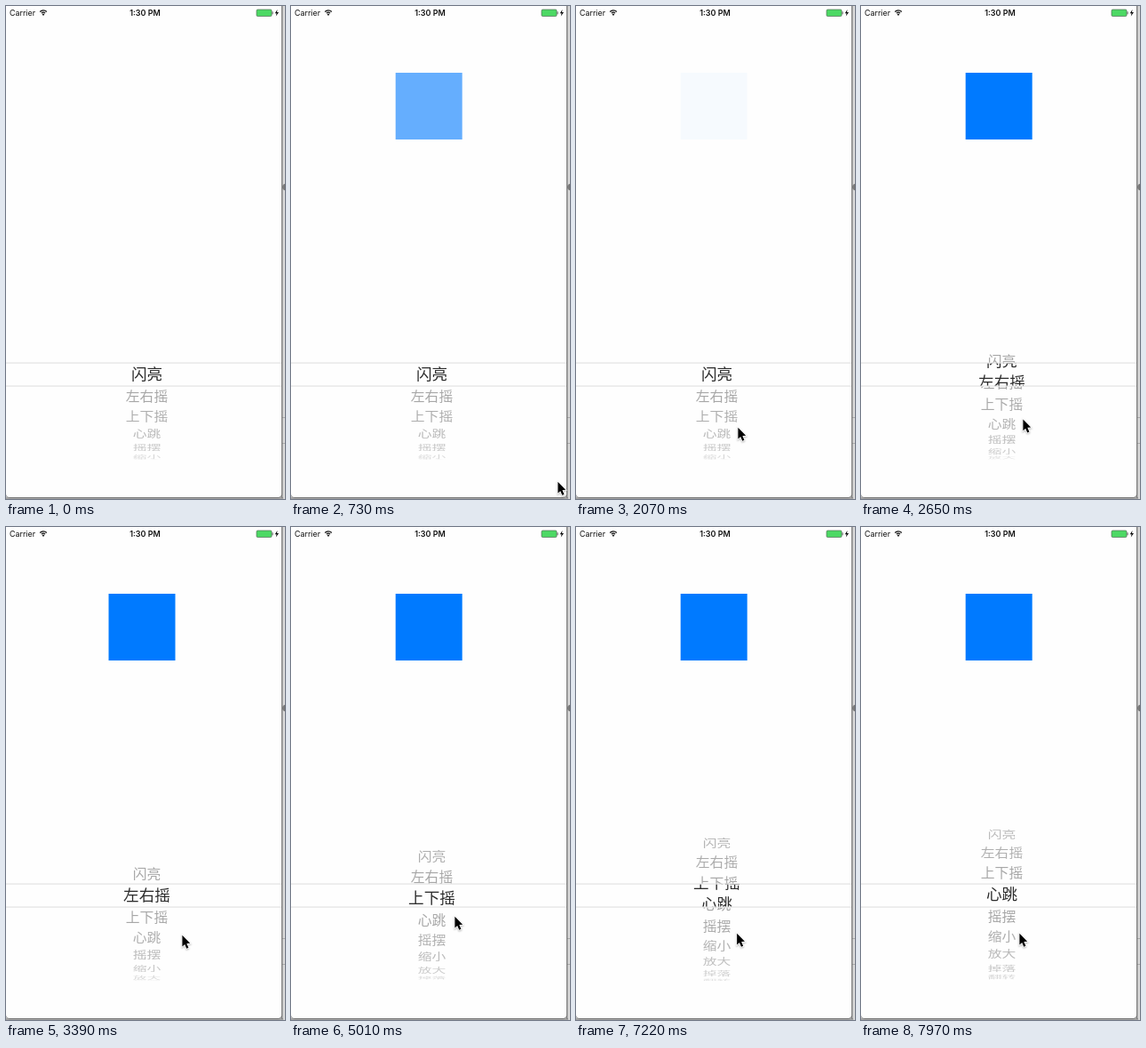
Animation of 314x554 px, one loop 8 s. Source, as an HTML page with a canvas:

```html
<!DOCTYPE html>
<html lang="zh">
<head>
<meta charset="utf-8">
<style>
html, body { margin: 0; width: 100%; height: 100%; overflow: hidden; background: #fff; }
canvas { display: block; width: 314px; height: 554px; }
</style>
</head>
<body>
<canvas id="stage" width="314" height="554"></canvas>
<script>
const ctx = document.getElementById('stage').getContext('2d');
const LOOP = 8000;
const LATIN = 'Inter, "Liberation Sans", sans-serif';
const CJK = '"Noto Sans CJK SC", "Noto Sans CJK", sans-serif';
const ROWS = ['闪亮', '左右摇', '上下摇', '心跳', '摇摆', '缩小', '放大', '掉落', '翻转'];
const WHEEL = { x: 158.5, y: 414, radius: 96, step: 14.7 * Math.PI / 180, top: 318, bottom: 510 };
const BAND = { top: 401, bottom: 427 };
const SHAKE = { period: 260, cycles: 4, reach: 7.5 };
const FLASH = { period: 1044, end: 2610 };

// Eased 0 -> 1 between two times
function glide(t, from, to) {
  const u = Math.min(1, Math.max(0, (t - from) / (to - from)));
  return u * u * (3 - 2 * u);
}

// 0 -> 1 -> 0 over one period
function triangle(t, period) {
  return 1 - Math.abs(2 * (t % period) / period - 1);
}

function shake(t) {
  if (t < 0 || t >= SHAKE.period * SHAKE.cycles) return 0;
  return SHAKE.reach * (2 * triangle(t, SHAKE.period) - 1);
}

// Three drags, one row each; the last slightly overshoots
function scrollAt(t) {
  return glide(t, 2200, 2980) + glide(t, 4050, 5300) + 1.06 * glide(t, 6550, 7820);
}

function cursorAt(t) {
  const enter = glide(t, 730, 1900);
  const press = glide(t, 4050, 4850);
  return {
    x: 299 - 118 * enter + 16 * glide(t, 2750, 3240) - 14 * press - 6 * glide(t, 6550, 7820),
    y: 533 - 61 * enter - 15 * glide(t, 2200, 2980) - 21 * press + 19 * glide(t, 5500, 6200)
  };
}

function rect(x, y, w, h, color) {
  ctx.fillStyle = color;
  ctx.fillRect(x, y, w, h);
}

function rounded(x, y, w, h, radii, color) {
  ctx.fillStyle = color;
  ctx.beginPath();
  ctx.roundRect(x, y, w, h, radii);
  ctx.fill();
}

function polygon(points) {
  ctx.beginPath();
  points.forEach(([x, y]) => ctx.lineTo(x, y));
  ctx.closePath();
}

function clipped(top, bottom, draw) {
  ctx.save();
  ctx.beginPath();
  ctx.rect(0, top, 314, bottom - top);
  ctx.clip();
  draw();
  ctx.restore();
}

function drawWindow() {
  rect(0, 0, 314, 554, '#d6d6d6');
  [462, 491].forEach(y => rect(311, y, 3, 1, '#aaa'));
  ctx.fillStyle = '#777';
  ctx.beginPath();
  ctx.arc(315, 203.5, 3.8, 0, 7);
  ctx.fill();
  rect(0, 552, 312, 2, '#a4a4a4');
  rect(310, 0, 1.3, 553, '#7c7c7c');
  rounded(-0.5, -10, 311.5, 563, [0, 0, 5, 5], '#777');
  rounded(0, -10, 310, 562, [0, 0, 4, 4], '#fefefe');
}

function drawStatusBar() {
  ctx.fillStyle = '#111';
  ctx.textBaseline = 'alphabetic';
  ctx.textAlign = 'left';
  ctx.font = '8.9px ' + LATIN;
  ctx.fillText('Carrier', 4, 11);
  ctx.textAlign = 'center';
  ctx.font = '600 9px ' + LATIN;
  ctx.fillText('1:30 PM', 156.5, 11);

  ctx.strokeStyle = '#111';
  ctx.lineWidth = 1.3;
  [2.8, 5.2].forEach(r => {
    ctx.beginPath();
    ctx.arc(42, 10, r, -Math.PI * 0.76, -Math.PI * 0.24);
    ctx.stroke();
  });
  polygon([[42, 11], [40.6, 9.2], [42, 8.6], [43.4, 9.2]]);
  ctx.fill();

  rounded(282, 4, 17, 7.5, 1.2, '#4cd964');
  ctx.strokeStyle = '#4f6a55';
  ctx.lineWidth = 0.7;
  ctx.stroke();
  rect(299.5, 6.3, 1, 3, '#555');
  ctx.fillStyle = '#111';
  polygon([[305.5, 4], [302.6, 8.2], [304.5, 8.2], [303.8, 11.5], [307, 7], [305, 7]]);
  ctx.fill();
}

function drawSquare(t) {
  ctx.globalAlpha = t < FLASH.end ? triangle(t, FLASH.period) : 1;
  rect(117.7 + shake(t - 3085), 75 + shake(t - 5530), 75, 75, '#007aff');
  ctx.globalAlpha = 1;
}

function drawRows(scroll, size, color, fade, lift) {
  ctx.font = size + 'px ' + CJK;
  ctx.textAlign = 'center';
  ctx.fillStyle = color;
  ROWS.forEach((label, i) => {
    const angle = (i - scroll) * WHEEL.step;
    if (Math.abs(angle) >= Math.PI / 2) return;
    const depth = Math.cos(angle);
    ctx.save();
    ctx.globalAlpha = 1 - fade * (1 - depth);
    ctx.translate(WHEEL.x, WHEEL.y + WHEEL.radius * Math.sin(angle) - lift);
    ctx.scale(1, depth);
    ctx.fillText(label, 0, size * 0.38);
    ctx.restore();
  });
}

function drawPicker(scroll) {
  const outer = () => drawRows(scroll, 15.8, '#a5a5a5', 0.8, 0);
  clipped(WHEEL.top, BAND.top, outer);
  clipped(BAND.bottom, WHEEL.bottom, outer);
  clipped(BAND.top, BAND.bottom, () => drawRows(scroll, 17.6, '#2c2c2c', 0, 0.7));
  [BAND.top, BAND.bottom].forEach(y => rect(0, y - 0.5, 310, 1.2, '#e4e4e4'));
}

function drawCursor(t) {
  if (t < 730) return;
  const { x, y } = cursorAt(t);
  ctx.save();
  ctx.translate(x + 1.4, y + 1.8);
  ctx.scale(0.9, 0.9);
  polygon([[0, 0], [0, 14], [3.1, 11.2], [5.4, 16.6], [7.8, 15.6], [5.5, 10.3], [9.8, 10]]);
  ctx.shadowColor = 'rgba(0,0,0,.3)';
  ctx.shadowBlur = 2;
  ctx.shadowOffsetY = 1;
  ctx.strokeStyle = '#fff';
  ctx.lineWidth = 1.8;
  ctx.stroke();
  ctx.shadowColor = 'transparent';
  ctx.fillStyle = '#000';
  ctx.fill();
  ctx.restore();
}

function render(t) {
  drawWindow();
  drawStatusBar();
  drawSquare(t);
  drawPicker(scrollAt(t));
  drawCursor(t);
}

const start = performance.now();
function tick() {
  render((performance.now() - start) % LOOP);
  requestAnimationFrame(tick);
}
tick();
</script>
</body>
</html>
```
